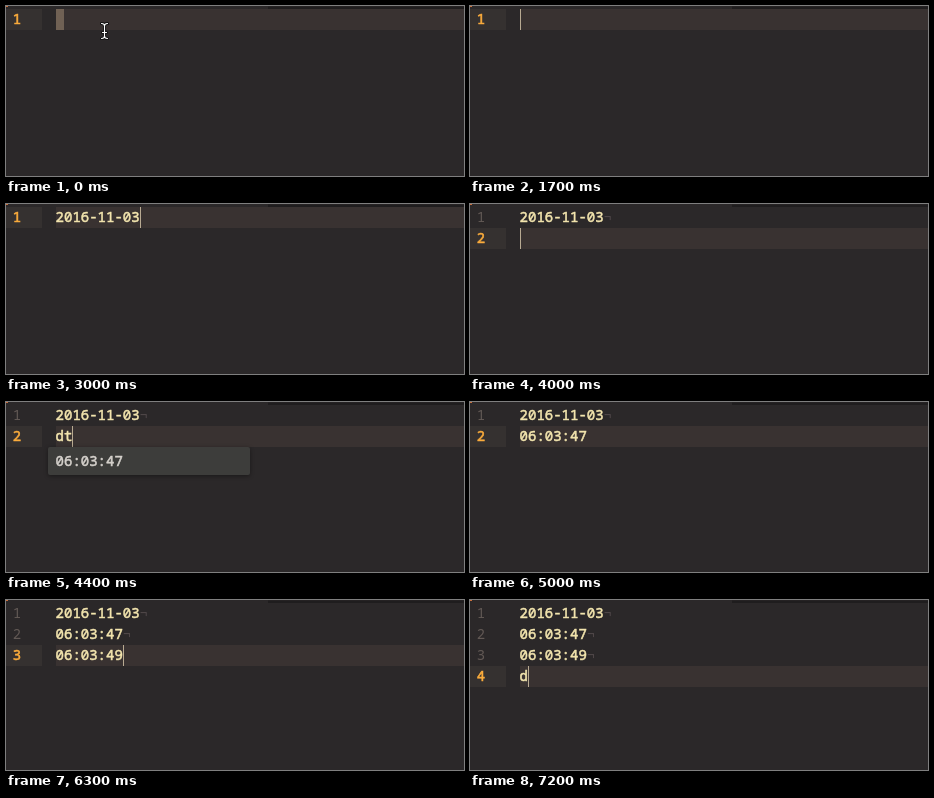
Animation of 458 by 170 pixels, one loop 7300 ms. Source, as an HTML page:

```html
<!DOCTYPE html>
<html lang="en">
<head>
<meta charset="utf-8">
<title>Date and time completion</title>
<style>
  html, body { margin: 0; width: 100%; height: 100%; overflow: hidden; background: #2b2829; }
  svg { display: block; }
  text {
    font: 500 14px "Noto Sans Mono", "DejaVu Sans Mono", monospace;
    fill: #f3e5ae; stroke: #f3e5ae; stroke-width: .55px; white-space: pre;
  }
  .num { fill: #625955; stroke: none; }
  .num.on { fill: #fbac3c; stroke: #fbac3c; }
  .eol { fill: #51494a; stroke: none; }
  #popup rect { fill: #3d3d3b; filter: drop-shadow(0 1px 2px rgba(0, 0, 0, .4)); }
  #popup text { fill: #d5d1cc; stroke: #d5d1cc; }
</style>
</head>
<body>
<svg width="458" height="170" viewBox="0 0 458 170">
  <rect width="458" height="170" fill="#2b2829"/>
  <rect x="262" width="196" height="1" fill="#252223"/>
  <rect x="262" y="1" width="196" height="2" fill="#1f1d1e"/>
  <rect width="2" height="1" fill="#c8703f"/>
  <g id="active">
    <rect y="3" width="36" height="21" fill="#353130"/>
    <rect x="50" y="3" width="408" height="21" fill="#393231"/>
  </g>
  <rect id="block" x="50" y="3" width="8" height="21" fill="#706154"/>
  <g id="rows"></g>
  <rect id="bar" width="1" height="21" fill="#b8aa92"/>
  <g id="popup">
    <rect x="42" y="24" width="202" height="28" rx="2"/>
    <text x="49.6" y="43"></text>
  </g>
  <g id="mouse" fill="none" stroke-linecap="round">
    <path d="M95.5 17.5q3 0 3 2.5v10q0 2.5-3 2.5M101.5 17.5q-3 0-3 2.5M101.5 32.5q-3 0-3-2.5M96.5 26.5h4" stroke="#111" stroke-width="3"/>
    <path d="M95.5 17.5q3 0 3 2.5v10q0 2.5-3 2.5M101.5 17.5q-3 0-3 2.5M101.5 32.5q-3 0-3-2.5M96.5 26.5h4" stroke="#fff" stroke-width="1.1"/>
  </g>
</svg>
<script>
  const LOOP = 7300, LINE = 21, CHAR = 8.4, LEFT = 49.6, MAX_ROWS = 4;
  const DATE = "2016-11-03", TIME1 = "06:03:47", TIME2 = "06:03:49";
  const done = [DATE, TIME1, TIME2];

  // [start ms, active row, its text, cursor, popup text]
  const steps = [
    [0, 0, "", "block"],
    [1700, 0, "", "bar"],
    [2000, 0, "d", "bar"],
    [2200, 0, "da", "bar"],
    [2400, 0, "dat", "bar"],
    [2500, 0, "date", "bar"],
    [2600, 0, "date", "bar", DATE],
    [2900, 0, DATE, ""],
    [3000, 0, DATE, "bar"],
    [3400, 0, DATE, ""],
    [3600, 1, "", "bar"],
    [4100, 1, "d", "bar"],
    [4300, 1, "dt", "bar"],
    [4400, 1, "dt", "bar", TIME1],
    [4900, 1, TIME1, ""],
    [5200, 2, "", "bar"],
    [5700, 2, "ti", "bar"],
    [5800, 2, "tim", "bar"],
    [6000, 2, "time", "bar"],
    [6100, 2, "time", "bar", TIME2],
    [6300, 2, TIME2, "bar"],
    [6600, 3, "", "bar"],
    [7200, 3, "d", "bar"]
  ];

  const $ = id => document.getElementById(id);
  const show = (el, on) => { el.style.display = on ? "" : "none"; };
  const shift = (el, y) => el.setAttribute("transform", `translate(0 ${y})`);

  function addText(x, y, cls) {
    const el = document.createElementNS("http://www.w3.org/2000/svg", "text");
    el.setAttribute("x", x);
    el.setAttribute("y", y);
    if (cls) el.setAttribute("class", cls);
    return $("rows").appendChild(el);
  }

  const rows = Array.from({ length: MAX_ROWS }, (_, i) => {
    const y = 18 + i * LINE;
    const row = { num: addText(6.8, y, "num"), code: addText(LEFT, y) };
    row.num.textContent = i + 1;
    if (i < done.length) {
      row.eol = addText(LEFT + done[i].length * CHAR, y, "eol");
      row.eol.textContent = "¬";
    }
    return row;
  });

  function draw([, active, typed, cursor, hint]) {
    rows.forEach((row, i) => {
      show(row.num, i <= active);
      row.num.classList.toggle("on", i === active);
      row.code.textContent = i < active ? done[i] : i === active ? typed : "";
      if (row.eol) show(row.eol, i < active);
    });
    const y = active * LINE;
    shift($("active"), y);
    shift($("popup"), y);
    show($("popup"), hint);
    $("popup").lastElementChild.textContent = hint || "";
    show($("block"), cursor === "block");
    show($("mouse"), cursor === "block");
    show($("bar"), cursor === "bar");
    $("bar").setAttribute("x", Math.round(LEFT + typed.length * CHAR));
    $("bar").setAttribute("y", 3 + y);
  }

  const start = performance.now();
  let current;
  function tick() {
    const t = (performance.now() - start) % LOOP;
    const step = steps.findLast(s => s[0] <= t);
    if (step !== current) draw(current = step);
    requestAnimationFrame(tick);
  }
  tick();
</script>
</body>
</html>
```
